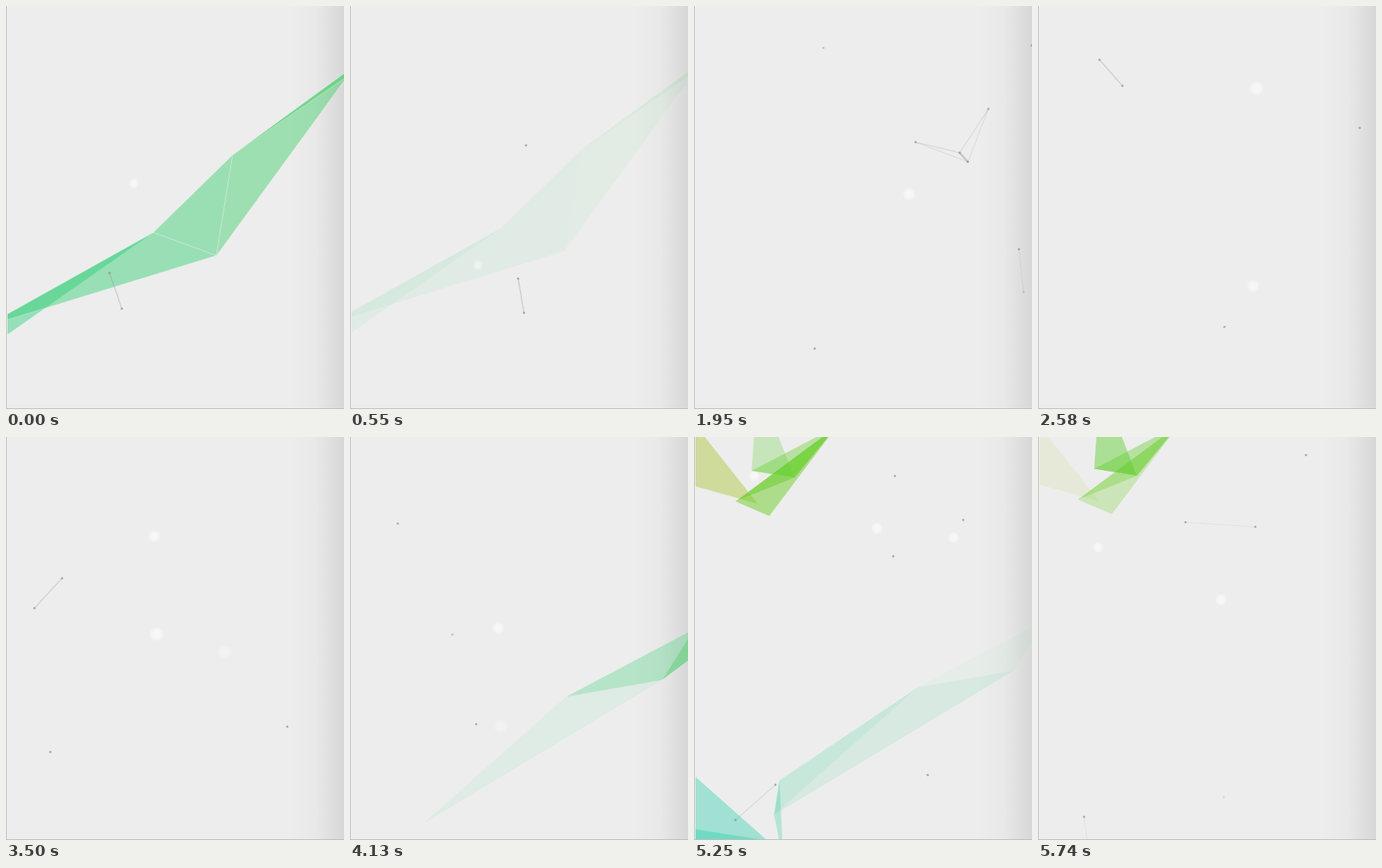
Write an HTML page with a canvas that moves like this. It is 440 px wide and 525 px high and loops after 5.81 s.

```html
<!DOCTYPE html>
<html>
<head>
<meta charset="utf-8">
<style>
html, body { margin: 0; width: 100%; height: 100%; overflow: hidden; background: #ededed; }
canvas { display: block; }
</style>
</head>
<body>
<canvas id="stage" width="440" height="525"></canvas>
<script>
const W = 440, H = 525, LOOP = 5810, STEP = 70, LINK = 100, BACK = '237,237,237';
const ctx = document.getElementById('stage').getContext('2d');

let seed = 11;
function random(min = 0, max = 1) {
  seed = (seed * 16807) % 2147483647;
  return min + (max - min) * seed / 2147483647;
}
const clamp = v => Math.max(0, Math.min(1, v));
const mix = (a, b, k) => a.map((v, i) => v + (b[i] - v) * k);

// A drifter passes through (x, y) at time `at`, in a straight line.
function drifter(x, y, at, life, heading, speed) {
  return { x, y, at, life, vx: speed * Math.cos(heading), vy: speed * Math.sin(heading) };
}
function locate({ x, y, at, life, vx, vy }, t) {
  const age = t - at;
  return { x: x + vx * age, y: y + vy * age, alpha: clamp((life - Math.abs(age)) * 5) };
}

// Groups of particles that meet closely enough to be joined by lines.
const meetings = [
  [1.4, [296, 134], [372, 127], [385, 117], [376, 187]],
  [2.59, [80, 70], [110, 104]],
  [3.5, [73, 184], [37, 223]],
  [5.25, [106, 453], [54, 499]],
  [5.74, [192, 111], [283, 117]]
];
const dots = meetings.flatMap(([at, ...points]) => points.map(([x, y]) =>
  drifter(x, y, at, 0.75, random(0, 2 * Math.PI), random(120, 200))));
for (let i = 0; i < 8; i++) {
  dots.push(drifter(random(40, W - 40), random(40, H - 40), i * 0.75, 1.3,
    random(0, 2 * Math.PI), random(120, 200)));
}

// Soft lights that sink slowly, more of them in the second half.
const glows = Array.from({ length: 9 }, (_, i) => ({
  ...drifter(random(40, W - 40), random(30, 260), 5.6 * Math.sqrt(i / 8), 0.8, Math.PI / 2, 190),
  r: random(7, 10)
}));

// Triangle strips: every three neighbouring points form a facet.
// `fade` holds start, full, fall and end; `stagger` delays each next facet.
const strips = [
  { points: [[-28, 449], [-28, 418], [192, 295], [274, 325], [295, 194], [455, 77], [470, 74]],
    colors: [[45, 205, 122], [72, 205, 92]], opacity: 0.46,
    fade: [-1, -0.5, 0, 0.65], stagger: 0, drift: [8, -10], at: 0, seam: 0.4 },
  { points: [[110, 560], [105, 455], [98, 500], [285, 334], [410, 312], [451, 246], [470, 267]],
    colors: [[40, 205, 160], [65, 205, 80]], opacity: 0.53,
    fade: [4.35, 4.65, 4.85, 5.7], stagger: -0.13, drift: [9, -11], at: 4.55, seam: 0.1 },
  { points: [[-20, 424], [-20, 560], [95, 526], [-20, 508]],
    colors: [[40, 205, 170], [40, 205, 170]], opacity: 0.39,
    fade: [4.2, 4.75, 5.25, 5.7], stagger: 0, drift: [2, -1], at: 5, seam: 0 },
  { points: [[-20, -43], [83, 87], [-20, 58]],
    colors: [[165, 195, 45], [165, 195, 45]], opacity: 0.46,
    fade: [4.5, 5.15, 5.2, 5.9], stagger: 0, drift: [-6, -6], at: 5.25, seam: 0 },
  { points: [[98, 103], [54, 84], [186, -14], [131, 53], [75, 44], [83, -69]],
    colors: [[110, 205, 40], [85, 205, 45]], opacity: 0.5,
    fade: [4.6, 5.1, 5.25, 6.3], stagger: 0.13, drift: [-4, -5], at: 5.25, seam: 0.1 }
];

function trace(points) {
  ctx.beginPath();
  for (const [x, y] of points) ctx.lineTo(x, y);
}

function drawBackground() {
  ctx.fillStyle = '#ededed';
  ctx.fillRect(0, 0, W, H);
  const shade = ctx.createLinearGradient(370, 0, W, 0);
  shade.addColorStop(0, '#ededed');
  shade.addColorStop(0.5, '#e8e8e8');
  shade.addColorStop(1, '#d7d7d7');
  ctx.fillStyle = shade;
  ctx.fillRect(370, 0, W - 370, H);
}

function drawStrip({ points, colors, opacity, fade, stagger, drift, at, seam }, t) {
  const [start, full, fall, end] = fade;
  const count = points.length - 2;
  ctx.save();
  ctx.translate(drift[0] * (t - at), drift[1] * (t - at));
  for (let i = 0; i < count; i++) {
    const local = t - stagger * i;
    const level = Math.min(clamp((local - start) / (full - start)), clamp((end - local) / (end - fall)));
    if (level === 0) continue;
    const facet = points.slice(i, i + 3);
    ctx.fillStyle = `rgba(${mix(...colors, i / count)},${opacity * level})`;
    trace(facet);
    ctx.fill();
    ctx.strokeStyle = `rgba(${BACK},${seam * level})`;
    ctx.closePath();
    ctx.stroke();
  }
  ctx.restore();
}

function drawGlow(glow, t) {
  const { x, y, alpha } = locate(glow, t), r = glow.r;
  if (alpha === 0) return;
  const light = ctx.createRadialGradient(x, y, 0, x, y, r);
  light.addColorStop(0, `rgba(252,252,252,${0.8 * alpha})`);
  light.addColorStop(0.6, `rgba(250,250,250,${0.65 * alpha})`);
  light.addColorStop(1, 'rgba(250,250,250,0)');
  ctx.fillStyle = light;
  ctx.fillRect(x - r, y - r, 2 * r, 2 * r);
}

function drawDots(t) {
  const places = dots.map(dot => locate(dot, t)).filter(p => p.alpha > 0);
  places.forEach((a, i) => places.slice(i + 1).forEach(b => {
    const near = 1 - Math.hypot(a.x - b.x, a.y - b.y) / LINK;
    if (near <= 0) return;
    ctx.strokeStyle = `rgba(150,150,150,${(0.1 + 0.45 * near) * a.alpha * b.alpha})`;
    ctx.lineWidth = 1 + 2 * near * near;
    trace([[a.x, a.y], [b.x, b.y]]);
    ctx.stroke();
  }));
  for (const { x, y, alpha } of places) {
    ctx.fillStyle = `rgba(125,125,125,${0.6 * alpha})`;
    ctx.beginPath();
    ctx.arc(x, y, 1.5, 0, 2 * Math.PI);
    ctx.fill();
  }
}

function draw(elapsed) {
  const t = Math.floor((elapsed % LOOP + 12) / STEP) * STEP % LOOP / 1000;
  drawBackground();
  ctx.save();
  ctx.beginPath();
  ctx.rect(2, 0, W - 2, H - 1);
  ctx.clip();
  glows.forEach(glow => drawGlow(glow, t));
  strips.forEach(strip => drawStrip(strip, t));
  drawDots(t);
  ctx.restore();
  ctx.fillStyle = '#bdbdbd';
  ctx.fillRect(0, 0, 1, H);
  ctx.fillRect(0, H - 1, W, 1);
}

let begin;
function frame(now) {
  begin ??= now;
  draw(now - begin);
  requestAnimationFrame(frame);
}
requestAnimationFrame(frame);
</script>
</body>
</html>
```
